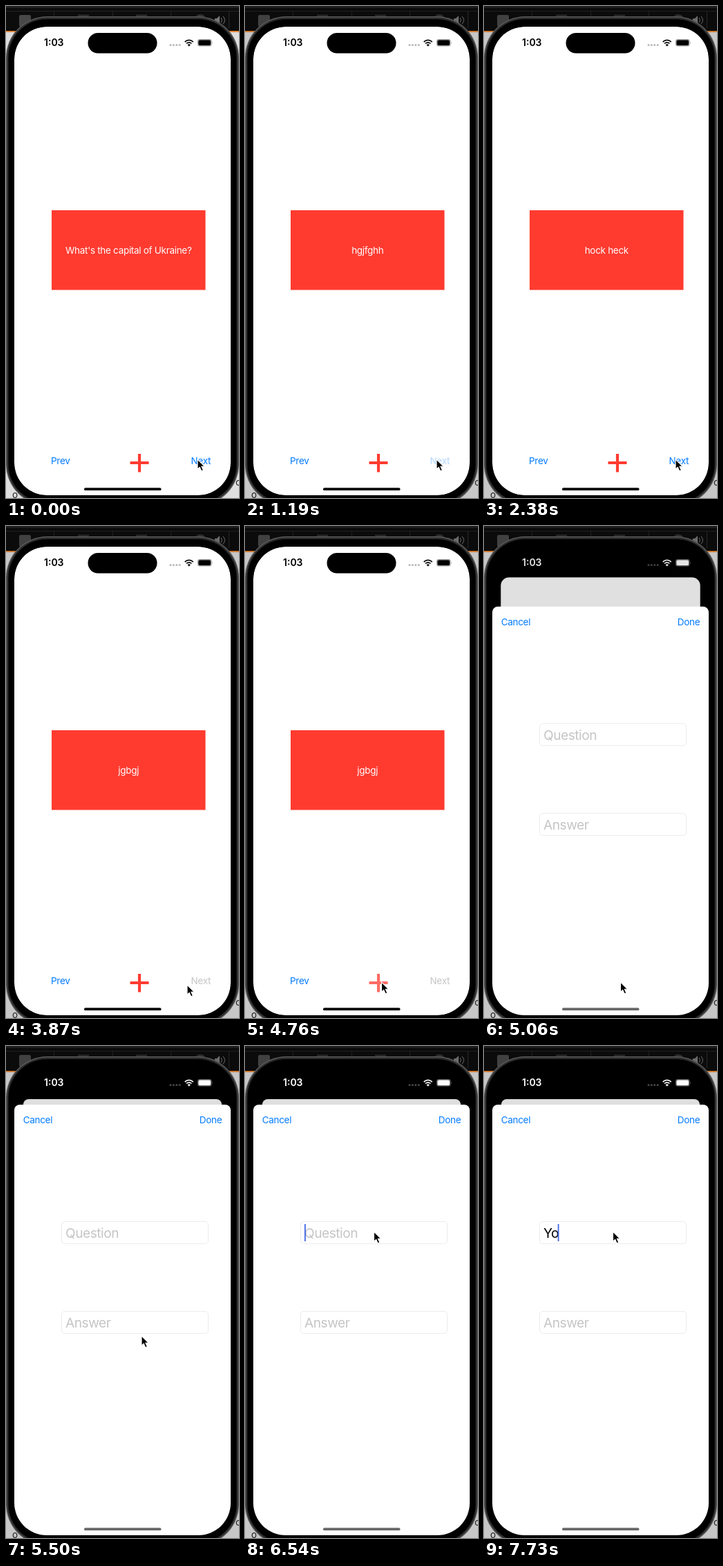
An HTML page for the animation above (8000 ms loop, 337x713 px).

```html
<!DOCTYPE html>
<html lang="en">
<head>
<meta charset="utf-8">
<title>Flash cards</title>
<style>
  html, body { margin: 0; width: 337px; height: 713px; overflow: hidden; background: #000; }
  svg { display: block; }
  text { font: 13.5px Inter, Roboto, sans-serif; letter-spacing: -.3px; }
  .blue { fill: #007aff; }
  .mid { text-anchor: middle; }
  .field rect { fill: #fff; stroke: #ececec; }
  .field text { font-size: 19.2px; letter-spacing: -.5px; fill: #c5c5c7; }
</style>
</head>
<body>
<svg width="337" height="713" viewBox="0 0 337 713">
  <defs>
    <clipPath id="screen"><rect x="12" y="30" width="313" height="679" rx="47"/></clipPath>
  </defs>

  <!-- desktop behind the phone -->
  <g id="desk">
    <rect width="337" height="713" fill="#dedede"/>
    <rect width="337" height="36" fill="#0c0c0c"/>
    <rect width="337" height="3" fill="#202020"/>
    <path d="M0 7.5H337M69.5 8V16M154.5 8V16M238.5 8V16" stroke="#242424"/>
    <rect y="36" width="337" height="2" fill="#e8893a"/>
    <rect x="19" y="13" width="17" height="17" rx="2" fill="#484848"/>
    <path d="M104 14h16M188 14h16" stroke="#2c2c2c" stroke-width="3"/>
    <circle cx="281" cy="20" r="8" fill="#333"/>
    <path d="M302 18h3l4-4v13l-4-4h-3z" fill="#777"/>
    <path d="M311 17q3 3.500 0 7M314 15q5 5.500 0 11" fill="none" stroke="#777"/>
    <path d="M322.500 8V32" stroke="#2c2c2c"/>
    <text x="9" y="713" fill="#222">o</text>
    <text x="332" y="695" fill="#222">o</text>
  </g>
  <rect id="shade" width="337" height="713" opacity="0"/>

  <!-- phone body -->
  <rect y="15" width="337" height="709" rx="60" fill="#585858"/>
  <rect x="1.500" y="16.500" width="334" height="706" rx="58.500" fill="#2b2b2b"/>
  <rect x="3.500" y="19" width="330" height="701" rx="56"/>

  <g clip-path="url(#screen)">
    <g id="app">
      <rect id="page" x="12" y="30" width="313" height="679" fill="#fff"/>
      <rect x="66" y="296" width="222.500" height="115.500" fill="#ff3b30"/>
      <text id="card" class="mid" x="177.300" y="358.700" fill="#fff"></text>
      <text class="blue" x="65" y="663.700">Prev</text>
      <text id="next" x="267.500" y="663.700">Next</text>
      <path id="plus" d="M179.500 662H206.500M193 649V675.500" stroke="#ff3b30" stroke-width="4.200"/>
      <rect id="dim" x="12" y="30" width="313" height="679"/>
    </g>
    <rect x="118.500" y="39" width="100" height="29.500" rx="14.700"/>

    <g id="status">
      <text x="55" y="58.300" style="font-size:14px;font-weight:600;letter-spacing:0">1:03</text>
      <g opacity=".28">
        <circle cx="238" cy="56.500" r="1.500"/><circle cx="242.400" cy="56.500" r="1.500"/>
        <circle cx="246.800" cy="56.500" r="1.500"/><circle cx="251.200" cy="56.500" r="1.500"/>
      </g>
      <path d="M264.700 58.500l-2.200-2.300q2.200-1.800 4.400 0z"/>
      <path id="waves" d="M258.700 52q6-5.400 12 0M261 54.400q3.700-3.200 7.400 0" fill="none" stroke-width="1.700"/>
      <rect x="277" y="48" width="20.500" height="10.500" rx="3.300" opacity=".38"/>
      <rect x="278.500" y="49.500" width="17.500" height="7.500" rx="2"/>
      <path d="M298.200 51.700q1.600 1.500 0 3z" opacity=".45"/>
    </g>

    <g id="sheet">
      <rect x="12" width="313" height="720" rx="8" fill="#fff"/>
      <text class="blue" x="24.700" y="26.900">Cancel</text>
      <text class="blue" x="312.300" y="26.900" text-anchor="end">Done</text>
      <g class="field">
        <rect x="80.500" y="169.500" width="212" height="32" rx="4.500"/>
        <text id="question" x="86" y="192.800"></text>
        <rect x="80.500" y="299.500" width="212" height="32" rx="4.500"/>
        <text x="86" y="322.800">Answer</text>
      </g>
      <rect id="caret" y="173" width="1.800" height="25" fill="#4468e6"/>
    </g>
    <rect id="home" x="113" y="698.300" width="111.500" height="3.700" rx="1.850"/>
  </g>

  <path id="cursor" d="M0 0V14.200L3.200 11.300 5.700 17 8.300 15.800 5.900 10.300H10.300Z" stroke="#fff" stroke-width="1.100"/>
</svg>

<script>
const LOOP = 8000;
const el = id => document.getElementById(id);
const set = (id, attrs) => {
  for (const k in attrs) el(id).setAttribute(k, attrs[k]);
};

// Each track is a list of [start time, ...values], held until the next entry.
const cards = [
  [0, "What's the capital of Ukraine?"], [890, "hgjfghh"], [1340, "hghj"],
  [1780, "hey"], [2380, "hock heck"], [2970, "jgbgj"]
];
const presses = [740, 1190, 1640, 2230, 2830];
const rise = [[0, 0], [4910, .567], [5060, .949], [5210, .99], [5360, .998], [5500, 1]];
const mouse = [
  [0, 277, 657], [3870, 262, 665], [4020, 222, 670], [4170, 174, 667], [4320, 188, 663],
  [4470, 197.500, 661], [5210, 198, 640], [5360, 198, 545], [5500, 196, 420],
  [5650, 194, 315], [5800, 193, 280], [5950, 193, 279], [6390, 188, 272], [6540, 186.500, 269]
];
const typing = [[0, "Question", 86], [7590, "Y", 97.500], [7730, "Yo", 106.700]];

const at = (track, t) => track.findLast(k => k[0] <= t).slice(1);

function draw(t) {
  const [p] = at(rise, t);
  const scale = 1 - .083 * p;
  const pressed = presses.some(s => t >= s && t < s + 145);
  const disabled = t >= 2970;

  set("shade", { opacity: t < 740 ? 0 : .1 });
  set("app", { transform: `translate(168.5 ${30 + 47 * p}) scale(${scale}) translate(-168.5 -30)` });
  const rx = (47 - 39 * p * p) / scale;
  set("page", { rx });
  set("dim", { rx, opacity: .13 * p });
  el("card").textContent = at(cards, t)[0];
  set("next", { fill: disabled ? "#c5c5c7" : "#007aff", opacity: pressed ? .3 : 1 });
  set("plus", { opacity: t >= 4760 && t < 4910 ? .75 : 1 });

  const g = Math.round(255 * p * p);
  const tone = `rgb(${g},${g},${g})`;
  set("status", { fill: tone });
  set("waves", { stroke: tone });
  set("home", { fill: p ? "#686868" : "#000" });

  const [text, caretX] = at(typing, t);
  set("sheet", { transform: `translate(0 ${709 - 624 * p})` });
  el("question").textContent = text;
  el("question").style.fill = t < 7590 ? "" : "#000";
  set("caret", { x: caretX, opacity: t < 6540 ? 0 : 1 });

  set("cursor", { transform: `translate(${at(mouse, t).join(" ")})` });
}

const start = performance.now();
function tick() {
  draw((performance.now() - start) % LOOP);
  requestAnimationFrame(tick);
}
tick();
</script>
</body>
</html>
```
